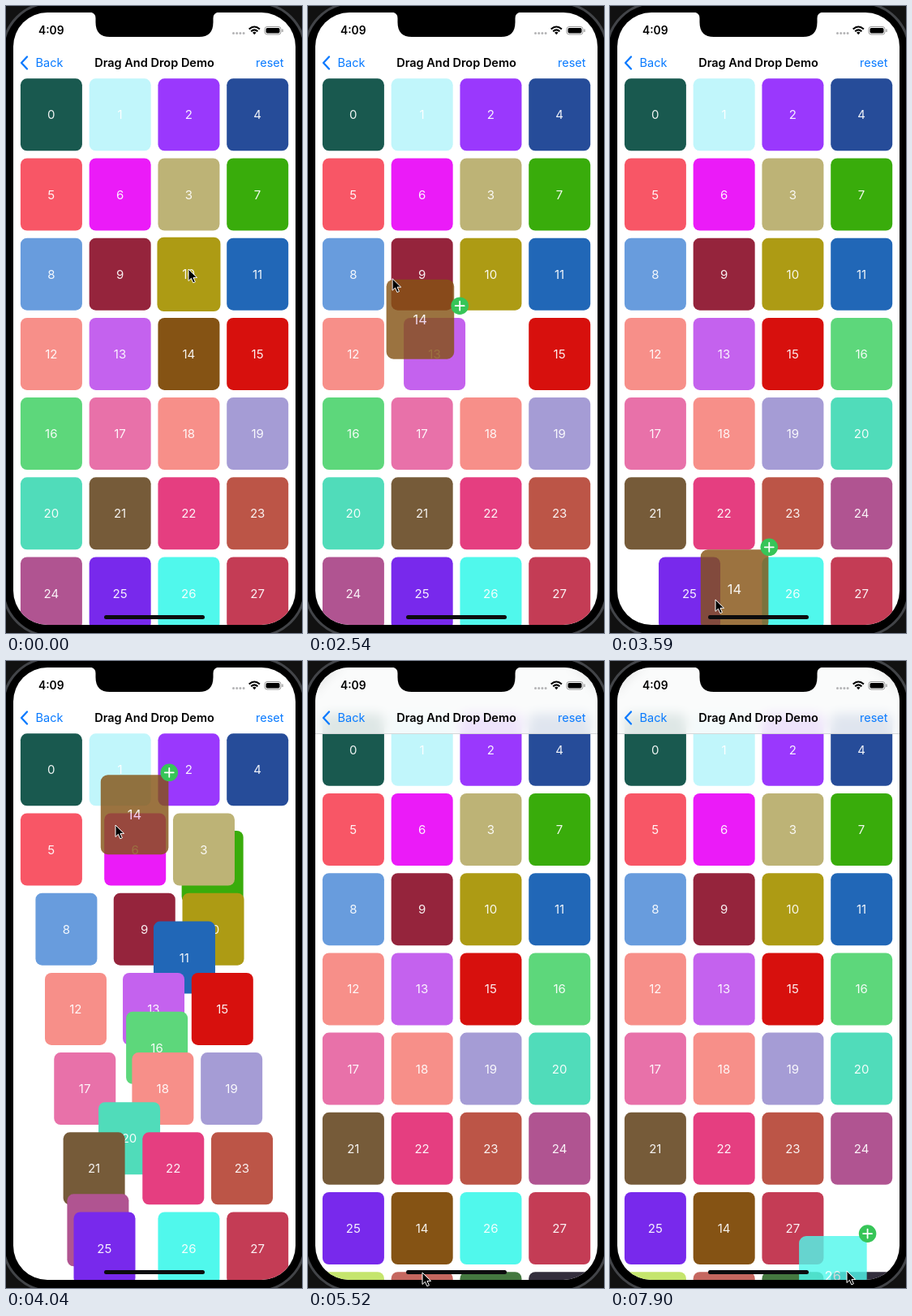
Recreate the animation shown at these times as an HTML page. Size 365x772 px, loop 8 s.

```html
<!DOCTYPE html>
<html lang="en">
<head>
<meta charset="utf-8">
<title>Drag And Drop Demo</title>
<style>
  html, body { margin: 0; width: 100%; height: 100%; overflow: hidden; background: #111; }
  #stage { position: absolute; width: 365px; height: 772px; overflow: hidden; font-family: Inter, sans-serif; }
  #rim { position: absolute; inset: -5px; border: 3px solid #424448; border-radius: 60px; background: #000; }
  #screen { position: absolute; inset: 0; background: #fff; clip-path: inset(8px 8px 10px 9px round 42px); }
  .tile, #ghost {
    position: absolute; left: 0; top: 0; width: 75.8px; height: 89.2px; border-radius: 8px;
    display: flex; align-items: center; justify-content: center;
    color: rgba(255, 255, 255, .93); font-size: 15px; transform-origin: 0 0;
  }
  #bar {
    position: absolute; left: 0; right: 0; top: 0; height: 89px; z-index: 5;
    background: rgba(250, 251, 251, .88); backdrop-filter: blur(7px); border-bottom: .5px solid #d4d6d8;
  }
  #ghost { z-index: 6; }
  svg { position: absolute; left: 0; top: 0; width: 365px; height: 772px; }
</style>
</head>
<body>
<div id="stage">
  <div id="rim"></div>
  <div id="screen">
    <div id="bar"></div>
    <div id="ghost"></div>
  </div>
  <svg viewBox="0 0 365 772">
    <path d="M103 7.5Q110.5 8 110.5 15V20Q110.5 38 128 38H238Q255.5 38 255.5 20V15Q255.5 8 263 7.5Z"/>
    <text x="40" y="35" font-size="13.8" font-weight="600">4:09</text>
    <path d="M280.5 33.5H294" stroke="#b4b4b6" stroke-width="3" stroke-linecap="round" stroke-dasharray="0 4.2"/>
    <g fill="none" stroke="#000" stroke-width="2.1">
      <path d="M299.7 28.6Q306.3 22.4 312.9 28.6M302.2 31.3Q306.3 27.5 310.4 31.3"/>
      <path d="M304 32.8Q306.3 30.9 308.6 32.8L306.3 35.3Z" fill="#000" stroke="none"/>
      <rect x="319" y="25.5" width="20" height="9.5" rx="3" stroke="#999" stroke-width="1"/>
      <path d="M341 28.5V32" stroke="#999" stroke-width="1.3"/>
    </g>
    <rect x="320.5" y="27" width="17" height="6.5" rx="1.7"/>
    <path d="M26 62.5L19 70L26 77.5" fill="none" stroke="#087aff" stroke-width="2.3" stroke-linecap="round" stroke-linejoin="round"/>
    <g font-size="14.5">
      <text x="36.5" y="75" fill="#087aff">Back</text>
      <text x="183" y="75" font-weight="600" text-anchor="middle">Drag And Drop Demo</text>
      <text x="342.5" y="75" fill="#087aff" text-anchor="end">reset</text>
    </g>
    <rect x="121" y="750" width="124" height="5" rx="2.5" fill="#0c0c0e"/>
    <g id="badge">
      <circle r="10.8" fill="#37c558"/>
      <path d="M-5.5 0H5.5M0 -5.5V5.5" stroke="#fff" stroke-width="1.8" stroke-linecap="round"/>
    </g>
    <path id="cursor" d="M0 0V14.5L3.4 11.3L5.8 16.8L8.4 15.7L6 10.4H10.6Z" stroke="#fff" stroke-width="1"/>
  </svg>
</div>
<script>
const LOOP = 8000, SHIFT = 500, SCALE = 1.1, GHOST_LAG = 30, BADGE_LAG = 49;
const COL = 84.77, ROW = 98.2, LEFT = 17.9, TOP = 89.3, GAP = 9, SCROLL = 24.5;

const colors = ('19594f c1f6fb 9a38fd bdb376 264c99 f85666 eb1bf8 39ac0b 689cdd 95243c ad9b14 2167b7 f78f89 c462ee ' +
  '855314 d7100d 5dd77b e871a9 f78f89 a59cd5 50dcba 765b39 e53e80 bc5547 b05491 7829ec 50f8ec c43c55 ' +
  'c5e56d c5675f 447840 332e3c').split(' ').map(c => '#' + c);

// Cursor strokes: start, end, x, y, and how late the sideways motion comes
const strokes = [
  [200, 620, 124, 424], [800, 1040, 185, 447], [1300, 1640, 204, 440],
  [2320, 2470, 124, 452], [2470, 2570, 99, 306], [2570, 2600, 240, 270], [2600, 3060, 25, 731, 3],
  [3150, 3400, 130, 731], [3588, 3947, 135, 202], [4400, 4850, 141, 753],
  [5650, 6200, 241, 693], [6750, 7450, 292, 751]
];

const drags = [
  { id: 10, lift: -60, move: 240, drop: 850, end: 1150, reorders: false },
  { id: 14, lift: 1950, move: 2230, drop: 4950, end: 5300, reorders: true },
  { id: 26, lift: 6400, move: 6770, drop: 9000, end: 9300, reorders: true }
];

const $ = id => document.getElementById(id);
const lerp = (a, b, p) => a + (b - a) * p;
const ease = p => { p = Math.min(1, Math.max(0, p)); return p * p * (3 - 2 * p); };
const slotX = s => LEFT + COL * (s % 4);
const slotY = s => TOP + ROW * Math.floor(s / 4);
const slotUnder = ([x, y]) =>
  4 * Math.floor((y - TOP + GAP / 2) / ROW) + Math.floor((x - LEFT + GAP / 2) / COL);
const scrollAt = t => SCROLL * ease((t - 4780) / 350);

function cursorAt(t) {
  let x = 225, y = 324;
  for (const [start, end, toX, toY, bend = 1] of strokes) {
    const p = ease((t - start) / (end - start));
    x = lerp(x, toX, p ** bend);
    y = lerp(y, toY, p);
  }
  return [x, y];
}

let order = colors.map((_, i) => i);
order.splice(3, 4, 4, 5, 6, 3);

const tiles = colors.map((color, id) => {
  const el = document.createElement('div');
  el.className = 'tile';
  el.textContent = id;
  el.style.background = color;
  if (id === 3) el.style.zIndex = 1;
  $('screen').append(el);
  return { el, slot: order.indexOf(id), moves: [] };
});

function reorder(t, id, slot) {
  const next = order.filter(n => n !== id);
  next.splice(slot, 0, id);
  next.forEach((n, to) => {
    const from = order.indexOf(n);
    if (from !== to) tiles[n].moves.push({ t, dx: slotX(to) - slotX(from), dy: slotY(to) - slotY(from) });
  });
  order = next;
}

// Whenever a dragged tile hovers over another slot, the rest make room
for (const d of drags.filter(d => d.reorders)) {
  for (let t = d.move; t < Math.min(d.drop, LOOP); t += 5) {
    const slot = slotUnder(cursorAt(t - GHOST_LAG));
    if (slot !== order.indexOf(d.id)) reorder(t, d.id, slot);
  }
}

// Overlapping moves add up, so a reversed move stays smooth
function tileAt(id, t) {
  const { slot, moves } = tiles[id];
  let x = slotX(slot), y = slotY(slot) - scrollAt(t);
  for (const m of moves) {
    const p = ease((t - m.t) / SHIFT);
    x += m.dx * p;
    y += m.dy * p;
  }
  return [x, y];
}

const place = (el, x, y, s = 1) => el.style.transform = `translate(${x}px,${y}px) scale(${s})`;

function drawDrag(d, t) {
  const home = tileAt(d.id, d.lift), start = cursorAt(d.lift);
  const grab = start.map((v, i) => v - home[i]);
  const back = ease((t - d.drop) / (d.end - d.drop));
  const scale = lerp(1 + (SCALE - 1) * ease((t - d.lift) / 180), 1, back);
  const held = cursorAt(Math.min(t, d.drop) - GHOST_LAG).map((v, i) => v - scale * grab[i]);
  const target = tileAt(d.id, t);
  const [x, y] = held.map((v, i) => lerp(v, target[i], back));

  const ghost = $('ghost');
  ghost.textContent = d.id;
  ghost.style.background = colors[d.id];
  ghost.style.opacity = lerp(1 - .19 * ease((t - d.move) / 100), 1, back);
  place(ghost, x, y, scale);

  const [bx, by] = cursorAt(t - BADGE_LAG);
  place($('badge'), bx + 84.5 - SCALE * grab[0], by - 3 - SCALE * grab[1]);
  $('badge').style.display = t > d.move + 60 && t < d.drop ? '' : 'none';

  const { el, moves } = tiles[d.id];
  el.style.opacity = t < d.move || moves.some(m => m.t < t) ? 0 : .5;
}

function draw(t) {
  tiles.forEach(({ el }, id) => {
    place(el, ...tileAt(id, t));
    el.style.opacity = 1;
  });
  $('bar').style.opacity = scrollAt(t) / SCROLL;
  const drag = drags.find(d => t >= d.lift && t < d.end);
  $('ghost').style.display = drag ? '' : 'none';
  if (drag) drawDrag(drag, t);
  else $('badge').style.display = 'none';
  place($('cursor'), ...cursorAt(t));
}

const begin = performance.now();
function frame() {
  draw((performance.now() - begin) % LOOP);
  requestAnimationFrame(frame);
}
frame();
</script>
</body>
</html>
```
